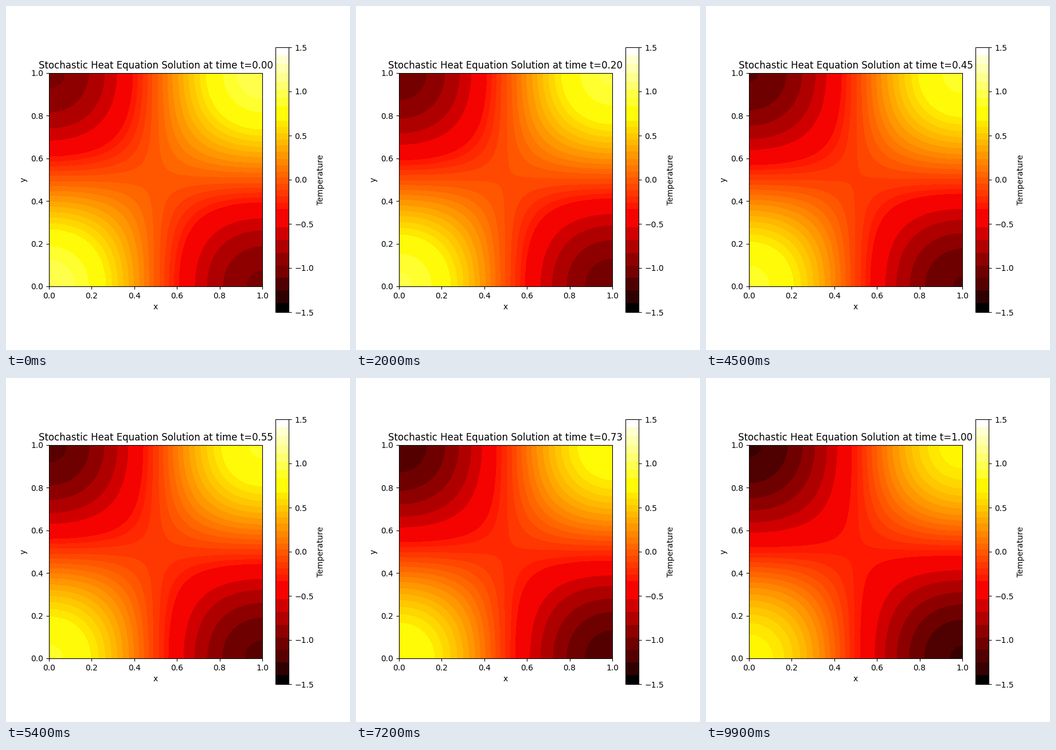
Recreate the animation shown at these times as a matplotlib script. Size 600 by 600 pixels, loop 10000 ms.

```python
import numpy as np
import matplotlib.pyplot as plt
from matplotlib.animation import FuncAnimation
from matplotlib.colors import ListedColormap

FRAMES = 100
SIZE = 372          # heat map side in pixels
LIMIT = 1.5         # temperature range is -LIMIT..LIMIT
DRIFT = -0.271      # mean temperature change per unit time
BAR_WEIGHT = 43     # colorbar pixels per colormap entry

# Solution without drift, sampled at pixel centres
x = (np.arange(SIZE) + 0.5) / SIZE
base = np.outer(np.cos(np.pi * x), np.cos(np.pi * x))

# Group the hot colormap into coarse colour bands (3, 4 and 3 bits)
hot = plt.get_cmap("hot")(np.arange(256))[:, :3]
levels = (hot * 255).astype(int)
keys = (levels >> [5, 4, 5]) @ [256, 16, 1]
band = np.unique(keys, return_inverse=True)[1].ravel()


def field(t):
    return base + DRIFT * t


def banded_cmap(u):
    """Colormap whose bands show the mean of the colours used in them."""
    index = np.clip((u + LIMIT) / (2 * LIMIT) * 256, 0, 255).astype(int)
    weight = np.bincount(index.ravel(), minlength=256) + BAR_WEIGHT
    total = np.bincount(band, weight)
    mean = np.stack([np.bincount(band, weight * c) / total for c in levels.T], axis=1)
    lut = mean[band] / 255
    lut[band == band[0]] = 0
    lut[band == band[-1]] = 1
    return ListedColormap(lut)


fig, ax = plt.subplots(figsize=(6, 6), dpi=100)
start = field(0)
image = ax.imshow(start, cmap=banded_cmap(start), vmin=-LIMIT, vmax=LIMIT,
                  extent=[0, 1, 0, 1], origin="lower", interpolation="nearest")
fig.colorbar(image, ax=ax, label="Temperature")
ax.set_xlabel("x")
ax.set_ylabel("y")
title = ax.set_title("")


def update(k):
    t = k / (FRAMES - 1)
    u = field(t)
    image.set_data(u)
    image.set_cmap(banded_cmap(u))
    title.set_text(f"Stochastic Heat Equation Solution at time t={t:.2f}")
    return image, title


anim = FuncAnimation(fig, update, frames=FRAMES, interval=100,
                     repeat=True, repeat_delay=0, blit=False)
plt.show()
```
